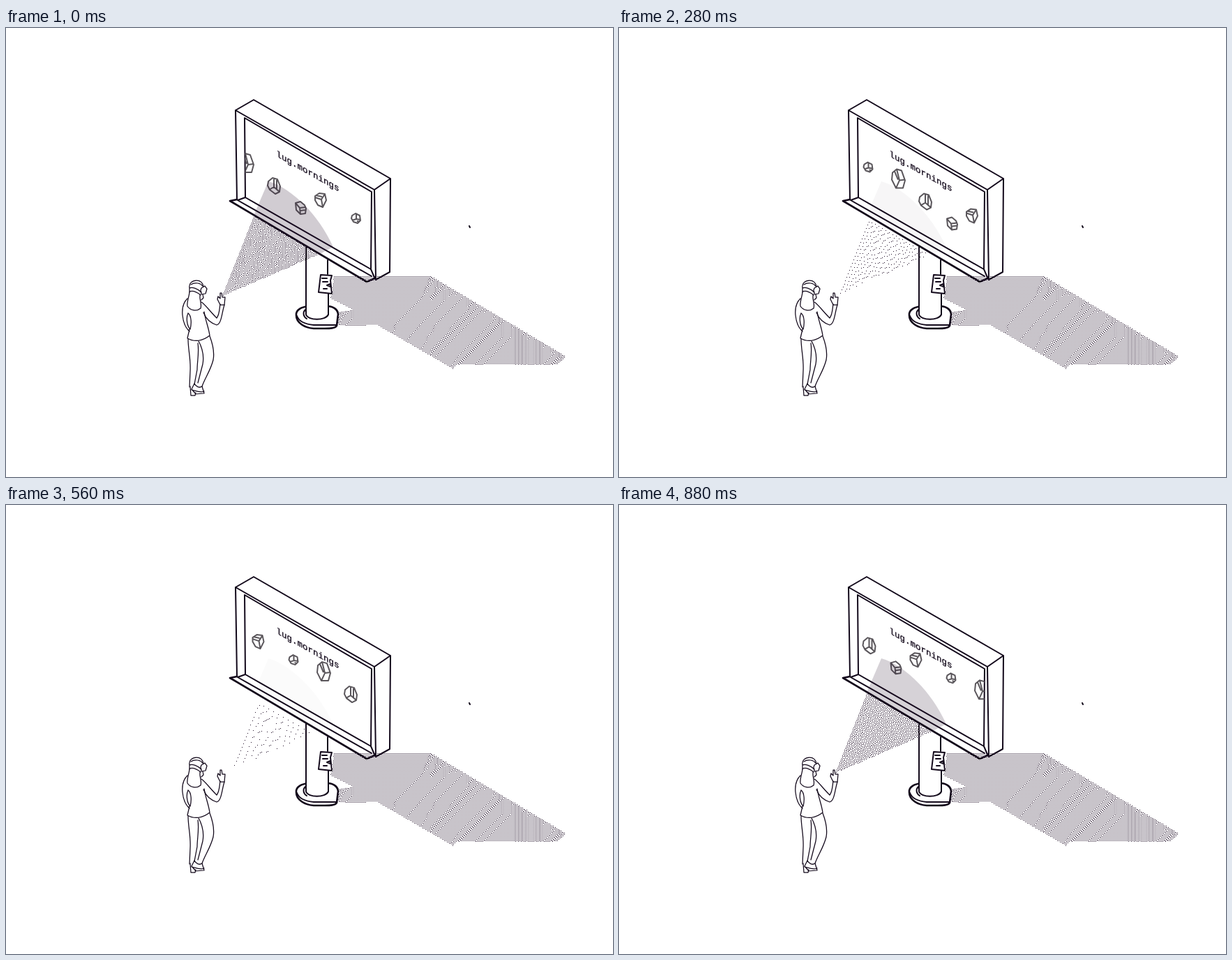
Write an HTML page with a canvas that moves like this. It is 870 by 644 pixels and loops after 0.92 s.

```html
<!DOCTYPE html>
<html lang="en">
<head>
<meta charset="utf-8">
<title>Billboard</title>
<style>
  html, body { margin: 0; width: 100%; height: 100%; overflow: hidden; background: #fff; }
  svg, canvas { position: absolute; left: 0; top: 0; width: 870px; height: 644px; }
  .line { fill: none; stroke: #12081a; stroke-width: 2; stroke-linejoin: round; stroke-linecap: round; }
  .thick { stroke-width: 2.7; }
  .thin { stroke-width: 1.25; }
  .solid { fill: #fff; }
  .cube { fill: none; stroke: #5a565b; stroke-width: 2; stroke-linejoin: round; }
  text { font: 12.5px "Liberation Mono", "Courier New", monospace; fill: #12081a; stroke: #12081a; stroke-width: .3; }
</style>
</head>
<body>
<svg viewBox="0 0 870 644">
  <defs>
    <clipPath id="screen"><path d="M342 129L524 235L523 346L343 243Z"/></clipPath>
  </defs>

  <!-- post and base -->
  <path class="line thick solid" d="M416 412C415 404 424 400 434 399H462C471 400 476 405 476 411L474 427C472 431 464 431 457 431H441C428 430 416 423 416 412Z"/>
  <path class="line" d="M417 413C420 421 430 425 441 426H473"/>
  <path class="solid" d="M430 310H461V410C457 420 432 420 430 410Z"/>
  <path class="line" d="M430 312V411C433 420 458 420 462 411V380M461 333V353M429 404C425 408 426 414 431 417"/>
  <path class="line solid" d="M451 354L467 355L465 362L467 381L448 379Z"/>
  <path class="line" d="M453 359H460M454 364H461M460 369L465 367V371ZM455 374H460"/>

  <!-- board -->
  <path class="solid" d="M329 118L355 103L551 216L550 350L529 361L517 364L321 249L331 245Z"/>
  <path class="line" d="M329 118L355 103L551 216L550 350L530 361L528 232L329 118L331 246M528 232L551 216"/>
  <path class="line" d="M342 129L524 235L523 346L343 243Z"/>
  <path class="line" d="M343 243L332 247L524 356M523 346L529 360"/>
  <path class="line thick" d="M331 246L321 248L517 364L529 359"/>
  <text transform="matrix(1 .565 0 1 387.5 184)">lug.mornings</text>
  <g id="cubes" clip-path="url(#screen)"></g>
  <path id="beam" fill="#26102a" d="M355 269L376 220C405 228 445 262 469 314L450 324Z"/>

  <!-- visitor with headset -->
  <g class="line thin">
    <path d="M263 373C262 366 267 362 273 362C278 362 282 365 283 371M263 373C267 371 275 374 280 379M263 378C268 376 274 379 279 383M263 373V379"/>
    <path d="M265 368C271 364 279 366 282 370"/>
    <path d="M280 373L285 370L288 374L286 381L280 382L279 376Z"/>
    <path d="M263 379C262 387 259 393 260 399C264 405 273 407 279 402C281 396 277 390 278 383M282 382L283 387L280 390"/>
    <path d="M260 388C254 394 252 402 253 412C254 422 257 430 263 435M261 409C266 413 266 424 264 432C259 427 258 415 261 409M263 432L260 445C270 451 282 449 292 441C290 428 286 420 284 407"/>
    <path d="M280 393C286 397 291 405 302 416C306 411 306 402 307 396M283 408C286 416 293 423 302 426C309 424 309 410 313 397"/>
    <path d="M307 397L303 389L304 385L307 388L307 380L309 380L310 386L314 386L313 397Z"/>
    <path d="M261 446C261 462 265 474 264 492L263 515M275 452C277 466 274 478 274 490L270 511"/>
    <path d="M292 442C297 455 299 465 297 476C293 492 285 502 281 514M276 449C282 460 284 470 282 482L275 509"/>
    <path d="M264 514L265 527H271L272 523M270 510L266 518L272 525L284 524L281 514C277 517 272 514 270 510M266 519C271 520 278 524 284 521"/>
  </g>
  <path class="line" d="M664 284L665 286"/>
</svg>
<canvas id="dots" width="870" height="644"></canvas>

<script>
const LOOP = 920, STEP = 40;

// time, travel along x, beam density
const KEYS = [
  [0, 0, .2], [160, 29, .14], [280, 55, .034], [320, 63, .012], [440, 88, .155],
  [560, 110, .016], [600, 118, .012], [680, 135, .05], [880, 174, .18]
];
const SLOPE = .41, WRAP = { x: 199.5, y: 96 }, EXIT = 535;

const CUBES = [
  { x: 345, y: 194, d: "M-8-9L-2-14L5-12L10 2L7 13L-3 13L-9 1ZM-2-14L2 2L10 1M2 2L-3 13M-5-11L0 1" },
  { x: 384, y: 226, d: "M-8-6L-2-11L5-9L9 1L8 9L2 12L-6 6L-9 0ZM0-10L0 2L-7 6M0 2L8 9M4-9L4 5" },
  { x: 422, y: 258, d: "M-7-7L0-9L6-4L8 1L7 8L0 9L-6 3ZM-7-7L-1 0L8-1M-1 0L0 9M0 4L7 3" },
  { x: 451, y: 247, d: "M-8-6L-2-10L6-9L8 0L3 10L-4 7L-8 0ZM-8-4L1-1L6-9M1-1L3 10M-7-7L2-5" },
  { x: 502, y: 273, d: "M-6-4L-1-7L5-4L6 3L2 7L-4 5L-7 0ZM0-6L0 1L-6 3M0 1L6 2M1 4L5 5" }
];

const ctx = document.getElementById("dots").getContext("2d");
const beam = document.getElementById("beam");
const group = document.getElementById("cubes");

for (const cube of CUBES) {
  cube.el = document.createElementNS("http://www.w3.org/2000/svg", "path");
  cube.el.setAttribute("class", "cube");
  cube.el.setAttribute("d", cube.d);
  group.append(cube.el);
}

function area(d, x, y, w, h) {
  const path = new Path2D(d), mask = new Uint8Array(w * h);
  for (let i = 0; i < mask.length; i++)
    mask[i] = ctx.isPointInPath(path, x + i % w + .5, y + Math.floor(i / w) + .5);
  return { x, y, w, h, mask };
}

// Even stippling of a shape: each dot's rounding error is passed to its neighbours.
function stipple({ x: x0, y: y0, w, h, mask }, density) {
  ctx.clearRect(x0, y0, w, h);
  ctx.fillStyle = "#23122a";
  let row = new Float32Array(w + 2);
  for (let y = 0; y < h; y++) {
    const next = new Float32Array(w + 2);
    for (let x = 1; x <= w; x++) {
      const inside = mask[y * w + x - 1];
      const v = row[x] + inside * density, on = inside && v > .5 ? 1 : 0, err = v - on;
      if (on) ctx.fillRect(x0 + x - 1, y0 + y, 1, 1);
      row[x + 1] += err * 7 / 16;
      next[x - 1] += err * 3 / 16;
      next[x] += err * 5 / 16;
      next[x + 1] += err / 16;
    }
    row = next;
  }
}

function sample(t, col) {
  let i = 0;
  while (i < KEYS.length - 2 && KEYS[i + 1][0] <= t) i++;
  const a = KEYS[i], b = KEYS[i + 1];
  return a[col] + (b[col] - a[col]) * (t - a[0]) / (b[0] - a[0]);
}

const shadow = area("M469 355H608L803 471L790 483H645L641 489L531 425L503 428L476 427L477 407L498 404L464 387L468 380Z", 464, 355, 340, 135);
const cone = area("M309 385L355 269L450 324Z", 309, 269, 142, 117);

function draw(t) {
  const travel = sample(t, 1), density = sample(t, 2);
  for (const cube of CUBES) {
    let x = cube.x + travel, y = cube.y + travel * SLOPE;
    if (x > EXIT) { x -= WRAP.x; y -= WRAP.y; }
    cube.el.setAttribute("transform", `translate(${x} ${y})`);
  }
  beam.setAttribute("opacity", density * 1.05);
  stipple(cone, density * 1.2);
}

let shown = -1;
function tick() {
  const t = Math.floor(performance.now() % LOOP / STEP) * STEP;
  if (t !== shown) draw(shown = t);
  requestAnimationFrame(tick);
}

stipple(shadow, .25);
tick();
</script>
</body>
</html>
```
